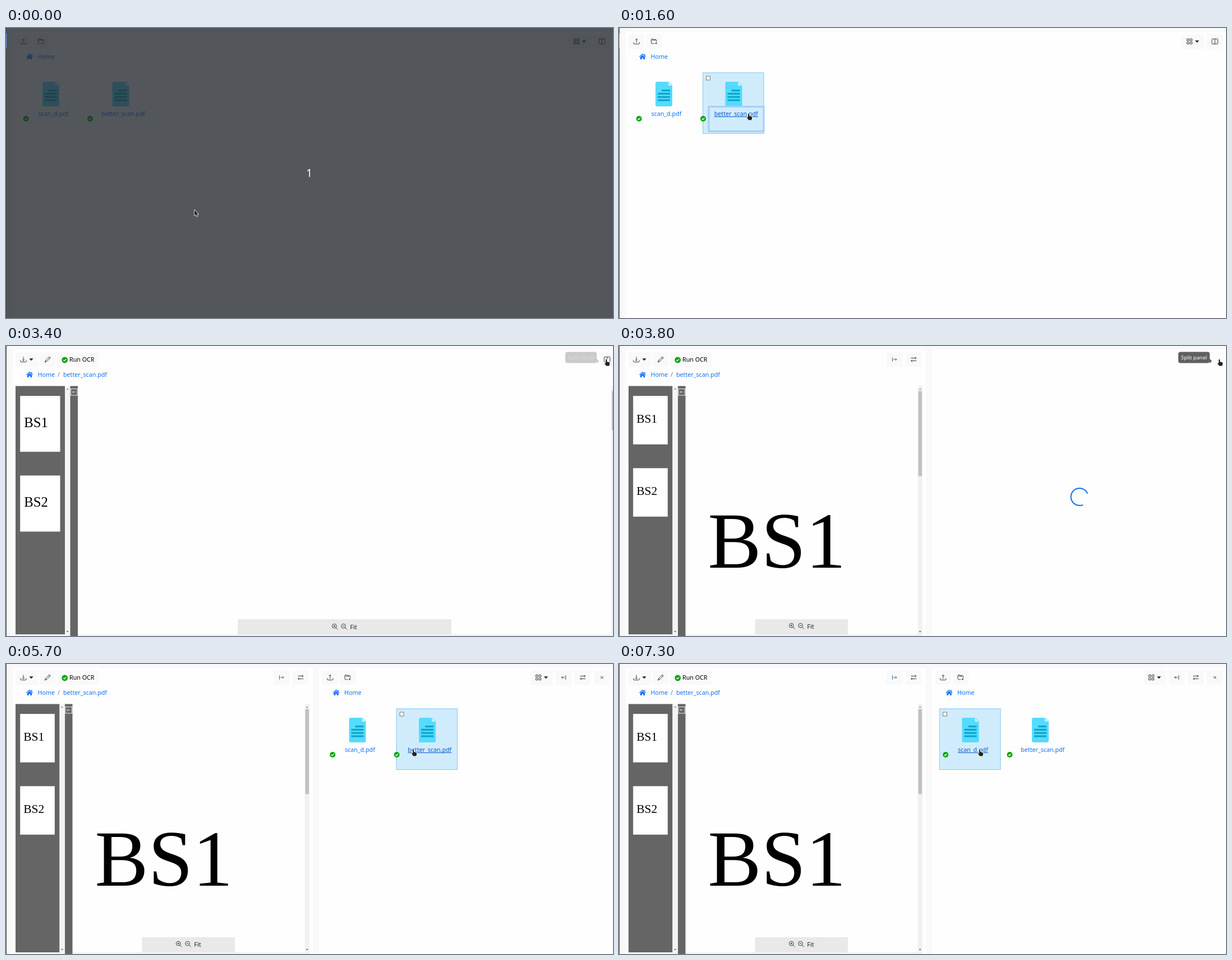
Write an HTML page with a canvas that moves like this. It is 1082 by 518 pixels and loops after 8 s.

```html
<!DOCTYPE html>
<html lang="en">
<head>
<meta charset="utf-8">
<title>Split panel demo</title>
<style>
  html, body { margin: 0; width: 100%; height: 100%; overflow: hidden; background: #f8f9f8; }
  canvas { display: block; width: 1082px; height: 518px; }
</style>
</head>
<body>
<canvas id="stage" width="1082" height="518"></canvas>
<script>
const ctx = document.getElementById('stage').getContext('2d');
const LOOP = 8000, STEP = 100;
const BLUE = '#0d6efd', DARK_BLUE = '#0a58ca', INK = '#212529', PALE = '#f8f9f8',
      PAPER = '#fefefe', GREY = '#656565', GREEN = '#0aa30e';
const SANS = '"Noto Sans", "Open Sans", sans-serif', SERIF = '"Liberation Serif", serif';
const RIGHT = 546.5; // offset of the second panel

// Icon outlines on a 16 unit grid
const TRAY = 'M.5 10v2.5a2 2 0 0 0 2 2h11a2 2 0 0 0 2-2V10';
const LENS = 'M12 6.5a5.5 5.5 0 1 1-11 0a5.5 5.5 0 1 1 11 0zM10.5 10.5L15.3 15.3M4 6.5h5';
const ICONS = {
  upload: TRAY + 'M8 11.5V1.5M5 4.5l3-3l3 3',
  download: TRAY + 'M8 1.5v10M5 8.5l3 3l3-3',
  folder: 'M9 13.5H3a1.5 1.5 0 0 1-1.5-1.4L.8 5.5a1 1 0 0 1 1-1H14a1 1 0 0 1 1 1l-.3 3.5M1.5 4.5V3A1.5 1.5 0 0 1 3 1.5h3l2 2h5.5M13.5 10v5M11 12.5h5',
  grid: 'M1.5 1.5h5v5h-5zM9.5 1.5h5v5h-5zM1.5 9.5h5v5h-5zM9.5 9.5h5v5h-5z',
  split: 'M2 1.5h12a1.5 1.5 0 0 1 1.5 1.5v10a1.5 1.5 0 0 1-1.5 1.5H2A1.5 1.5 0 0 1 .5 13V3A1.5 1.5 0 0 1 2 1.5zM8 1.5v13',
  pencil: 'M12.2 1L15 3.8L5.5 13.3L1 15l1.7-4.5zM10.3 3l2.8 2.8M2.7 10.5l2.8 2.8',
  toRight: 'M3 2.5v11M5.5 8h8M10.5 5l3 3l-3 3',
  toLeft: 'M13 2.5v11M10.5 8h-8M5.5 5l-3 3l3 3',
  swap: 'M15 11.5H1.5M4.5 8.5l-3 3l3 3M1 4.5h13.5M11.5 1.5l3 3l-3 3',
  close: 'M4.8 4.8l6.4 6.4M11.2 4.8l-6.4 6.4',
  back: 'M14 8H2.5M7 3.5L2.5 8L7 12.5',
  zoomIn: LENS + 'M6.5 4v5',
  zoomOut: LENS
};
const HOUSE = new Path2D('M8 .5L16 8l-1 1.2L8 2.8L1 9.2L0 8zM12 1.5h2v4l-2-2zM8 4.2l5.6 5V15H9.7v-4H6.3v4H2.4V9.2z');
const ARROW = new Path2D('M0 0v10l2.3-2l1.5 3.5l1.7-.7l-1.5-3.3h3z');
const HAND = new Path2D('M-1 0h2v4l4 1q1.2 .4 1 2v2l-1 2.5h-5l-3.2-4.2l1-1l1.2 1z');

// Pointer stops: time, x, y
const STOPS = [
  [300, 336, 325], [1100, 231, 153], [1700, 231, 153], [2400, 1079, 21], [2800, 1064, 24],
  [3100, 1064, 24], [3200, 1067, 24], [3300, 1067, 24], [3400, 1070, 24], [3900, 1070, 24],
  [4600, 784, 138], [5000, 650, 140], [5100, 650, 140], [5500, 736, 148], [5700, 726, 153],
  [6700, 726, 153], [7300, 643, 153]
];

function pointerAt(t) {
  const next = STOPS.findIndex(s => s[0] > t);
  if (next === 0) return { x: STOPS[0][1], y: STOPS[0][2] };
  if (next < 0) return { x: STOPS.at(-1)[1], y: STOPS.at(-1)[2] };
  const [t0, x0, y0] = STOPS[next - 1], [t1, x1, y1] = STOPS[next];
  const u = (t - t0) / (t1 - t0), k = u * u * (3 - 2 * u);
  return { x: x0 + (x1 - x0) * k, y: y0 + (y1 - y0) * k };
}

const inside = (p, x, y, w, h) => p.x >= x && p.x <= x + w && p.y >= y && p.y <= y + h;

function box(x, y, w, h, fill) {
  ctx.fillStyle = fill;
  ctx.fillRect(x, y, w, h);
}

function frame(x, y, w, h, color, width = 1) {
  ctx.strokeStyle = color;
  ctx.lineWidth = width;
  ctx.strokeRect(x, y, w, h);
}

function rounded(x, y, w, h, r, fill) {
  ctx.fillStyle = fill;
  ctx.beginPath();
  ctx.roundRect(x, y, w, h, r);
  ctx.fill();
}

function poly(fill, ...pts) {
  ctx.fillStyle = fill;
  ctx.beginPath();
  pts.forEach(([x, y]) => ctx.lineTo(x, y));
  ctx.fill();
}

function label(str, x, y, color, size = 10.7, family = SANS) {
  ctx.font = `${size}px ${family}`;
  ctx.fillStyle = color;
  ctx.fillText(str, x, y);
  return ctx.measureText(str).width;
}

function icon(name, cx, cy, color = INK, size = 11.2) {
  const k = size / 16;
  ctx.save();
  ctx.translate(cx - size / 2, cy - size / 2);
  ctx.scale(k, k);
  ctx.strokeStyle = color;
  ctx.lineWidth = 1.25;
  ctx.stroke(new Path2D(ICONS[name]));
  ctx.restore();
}

function button(x, w, name, cx = x + w / 2, color = INK) {
  rounded(x, 11.5, w, 26, 2, PALE);
  if (name) icon(name, cx, 24, color);
}

const caret = x => poly(INK, [x - 3.7, 22.3], [x + 3.7, 22.3], [x, 26.3]);

function tick(x, y, r) {
  ctx.fillStyle = GREEN;
  ctx.beginPath();
  ctx.arc(x, y, r, 0, 7);
  ctx.fill();
  ctx.strokeStyle = '#fff';
  ctx.lineWidth = 1.4;
  ctx.beginPath();
  ctx.moveTo(x - 2.4, y + .1);
  ctx.lineTo(x - .7, y + 1.8);
  ctx.lineTo(x + 2.4, y - 1.6);
  ctx.stroke();
}

function breadcrumb(dx, file) {
  ctx.save();
  ctx.translate(dx + 36, 45.5);
  ctx.scale(.75, .7);
  ctx.fillStyle = BLUE;
  ctx.fill(HOUSE);
  ctx.restore();
  label('Home', dx + 56.5, 55, BLUE);
  if (file) {
    label('/', 92, 55, '#6c757d');
    label(file, 102, 55, BLUE);
  }
}

function tile(x, name, iconX, textX, tickX, pointer, focused) {
  const hover = inside(pointer, x, 79, 110, 110);
  const linked = inside(pointer, textX, 149, 79, 11);
  if (hover) {
    box(x, 79.5, 109.5, 109.5, '#d0ecfc');
    frame(x + .5, 80, 108.5, 108.5, '#8dc8f1');
    rounded(x + 6, 85.5, 8, 8, 1.5, '#767676');
    rounded(x + 7, 86.5, 6, 6, 1, '#fff');
  }
  ctx.fillStyle = '#55dbfd';
  ctx.beginPath();
  ctx.roundRect(iconX, 96, 30, 44, 3);
  ctx.fill();
  poly(hover ? '#d0ecfc' : PAPER, [iconX + 23, 95], [iconX + 31, 95], [iconX + 31, 103]);
  poly('#c5f3fe', [iconX + 23, 96], [iconX + 30, 103], [iconX + 23, 103]);
  for (let i = 0; i < 4; i++) {
    const inset = i ? 4 : 11;
    box(iconX + inset, 110 + i * 5.8, 26 - inset, 3.2, '#0aa6cf');
  }
  if (focused) frame(160, 140.5, 98, 44, '#a5cdfa', 3);
  const color = linked ? DARK_BLUE : BLUE;
  const width = label(name, textX, 157, color);
  if (linked) box(textX, 158, width, 1, color);
  tick(tickX, 162, 5);
  return linked;
}

function browser(dx, pointer, focused) {
  button(dx + 17, 28.5, 'upload');
  button(dx + 48, 28.5, 'folder');
  const split = dx > 0;
  const gridX = split ? 935 : 1003;
  button(gridX, 39.5, 'grid', gridX + 14);
  caret(gridX + 27.5);
  if (split) {
    button(980, 28.5, 'toLeft');
    button(1014, 28.5, 'swap');
    button(1048, 28.5, 'close');
  } else {
    button(1048, 28.5, 'split');
  }
  breadcrumb(dx);
  const first = tile(dx + 24.5, 'scan_d.pdf', dx + 65, dx + 57.5, dx + 35.7, pointer);
  const second = tile(dx + 149, 'better_scan.pdf', dx + 189.5, dx + 169.7, dx + 150, pointer, focused);
  return first || second;
}

function scrollArrows(x) {
  poly('#8a8a8a', [x - 2, 78], [x + 2, 78], [x, 75.5]);
  poly('#606060', [x - 2, 509], [x + 2, 509], [x, 511.5]);
}

function viewer(split) {
  button(17, 40, 'download', 31);
  caret(45);
  button(60, 28.5, 'pencil');
  button(91, 74.5);
  tick(104.7, 25, 5.4);
  label('Run OCR', 113, 28, '#000');
  if (split) {
    button(477, 28.5, 'toRight', 491, '#1a4a8a');
    button(511, 28.5, 'swap');
  } else {
    button(1058, 28.5, 'split', 1071.5);
  }
  breadcrumb(0, 'better_scan.pdf');

  const side = split ? 95.5 : 105, end = split ? 541 : 1082;
  box(17, 515, end - 17, 3, '#f1f1f1');
  box(17, 71.5, side - 17, 443.5, GREY);
  box(side, 71.5, 9.5, 446.5, '#f4f4f4');
  scrollArrows(side + 4.7);
  box(side + 9.5, 71.5, 13.5, 446.5, GREY);
  frame(side + 10.5, 76.5, 11.5, 11.5, '#eee');
  icon('back', side + 16.2, 82.2, '#fff', 8.5);

  const w = side - 33.5, h = w * 1.4, size = w * .346;
  ['BS1', 'BS2'].forEach((name, i) => {
    const y = 89 + i * (h + 42.3);
    box(25, y, w, h, '#fff');
    frame(25.5, y + .5, w - 1, h - 1, '#d5d5d5', .7);
    label(name, 25 + w * .1, y + h * .557, '#000', size, SERIF);
  });

  if (split) {
    label('BS1', 158.6, 396, '#000', 142.5, SERIF);
    box(532.5, 71.5, 8.5, 443.5, '#f1f1f1');
    box(533.5, 80.5, 6.5, 152, '#c1c1c1');
    scrollArrows(536.7);
  } else {
    box(1079, 71.5, 3, 443.5, '#f1f1f1');
    box(1080, 80.5, 2, 69.5, '#bdbdbd');
  }

  const barX = split ? 242.5 : 413, zoomX = split ? 308.3 : 586.3, y = split ? 500.3 : 501.3;
  box(barX, 488, split ? 165.5 : 381, 27, '#e9e9e9');
  icon('zoomIn', zoomX, y);
  icon('zoomOut', zoomX + 16.3, y);
  label('Fit', zoomX + 27, y + 4.2, INK, 11);
}

function spinner(cx, t) {
  const start = (22 + (t - 3800) / 750 * 360 + 45) * Math.PI / 180;
  ctx.strokeStyle = '#1a78f5';
  ctx.lineWidth = 2.2;
  ctx.beginPath();
  ctx.arc(cx, 269.5, 15.4, start, start + Math.PI * 1.5);
  ctx.stroke();
}

function tooltip(alpha) {
  ctx.globalAlpha = alpha;
  rounded(997, 10.5, 56, 20, 4, '#606060');
  poly('#606060', [1053, 23], [1057, 27], [1053, 31]);
  label('Split panel', 1002, 23.5, '#fff', 9.4);
  ctx.globalAlpha = 1;
}

function drawPointer(p, hand) {
  ctx.save();
  ctx.translate(p.x, p.y);
  ctx.lineJoin = 'round';
  ctx.strokeStyle = '#fff';
  ctx.lineWidth = 1.5;
  ctx.fillStyle = '#222';
  const shape = hand ? HAND : ARROW;
  ctx.stroke(shape);
  ctx.fill(shape);
  ctx.restore();
}

function render(t) {
  const pointer = pointerAt(t), split = t >= 3800;
  let hand = t >= 2400 && t < 4000 && pointer.x > 1058;
  box(0, 0, 1082, 518, PALE);
  box(12, 7, 1070, 511, PAPER);
  if (split) box(547, 7, 11, 511, PALE);
  box(0, 0, 1, 518, '#444');

  if (t < 1700) {
    box(0, 10, 1, 26, '#5a9bf8');
    hand = browser(0, pointer, t >= 1600);
  } else if (t < 1900) {
    spinner(547, t);
  } else {
    viewer(split);
  }
  if (split) {
    if (t < 4100) spinner(821, t);
    else hand = browser(RIGHT, pointer);
  }
  if (t >= 3400 && t < 3900) tooltip(Math.min(1, (t - 3300) / 300));
  if (t < 100) {
    box(1, 0, 1081, 518, 'rgba(35, 40, 46, .78)');
    ctx.textAlign = 'center';
    label('1', 540.5, 266, '#fff', 19.5);
    ctx.textAlign = 'left';
  }
  drawPointer(pointer, hand);
}

const began = performance.now();
function tickFrame() {
  const t = (performance.now() - began) % LOOP;
  render(Math.floor(t / STEP) * STEP);
  requestAnimationFrame(tickFrame);
}
tickFrame();
</script>
</body>
</html>
```
